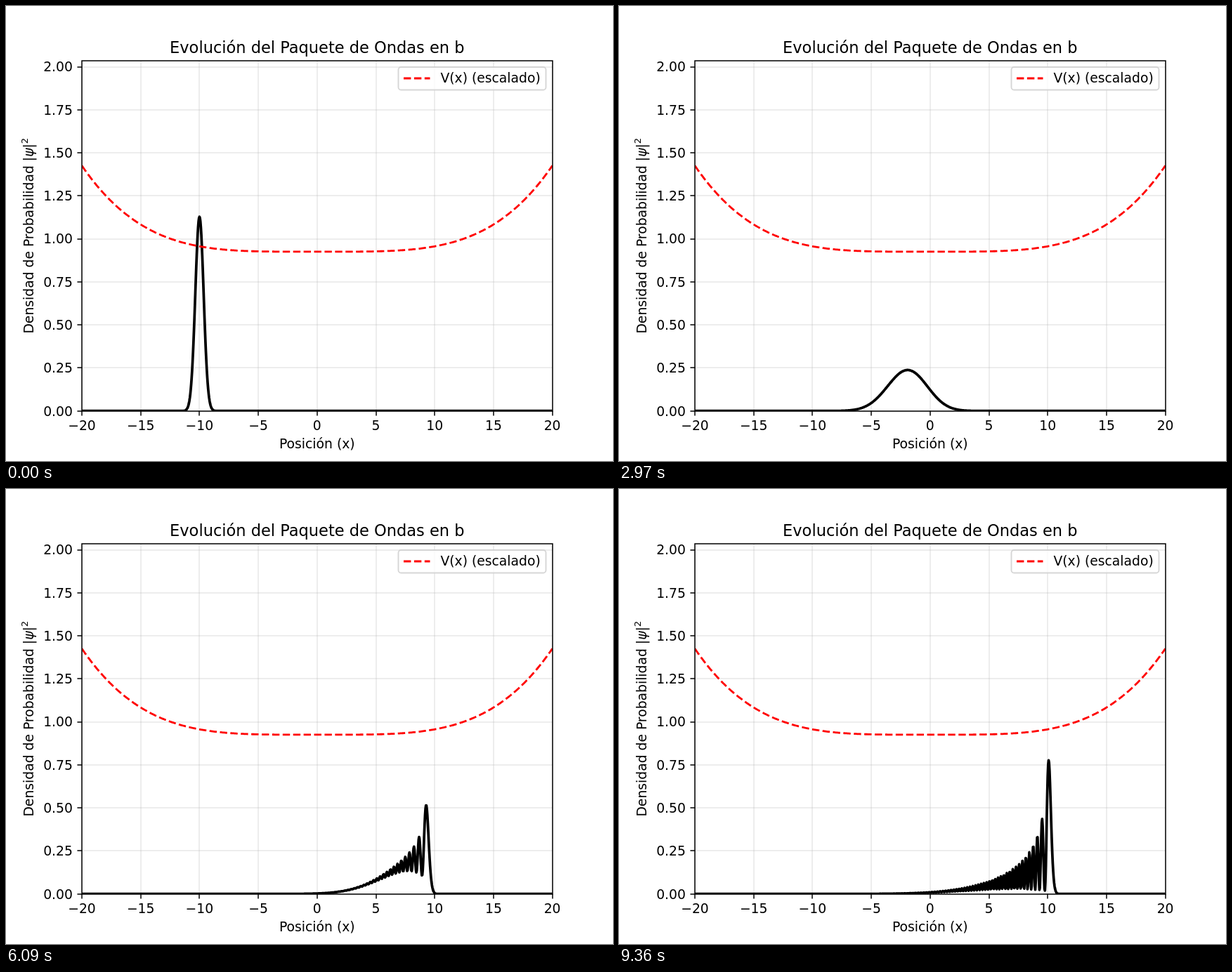
Animation, 864 px wide and 648 px high, one loop 9390 ms. Source, as an HTML page:

```html
<!DOCTYPE html>
<html lang="es">
<head>
<meta charset="utf-8">
<title>Evolución del paquete de ondas</title>
<style>
  html, body { margin: 0; width: 100%; height: 100%; overflow: hidden; background: #fff; }
  svg { display: block; width: 864px; height: 648px; font: 18.75px "DejaVu Sans", sans-serif; }
  .grid { stroke: #b0b0b0; stroke-opacity: .3; stroke-width: 1.5; }
  .axis { stroke: #000; stroke-width: 1.5; fill: none; }
  .potential { stroke: #f00; stroke-width: 2.8125; stroke-dasharray: 10.406 4.5; fill: none; }
  .density { stroke: #000; stroke-width: 3.75; stroke-linejoin: round; fill: none; }
  .legend { fill: #fff; fill-opacity: .8; stroke: #ccc; stroke-opacity: .8; stroke-width: 1.875; }
  .mid { text-anchor: middle; }
  .end { text-anchor: end; }
</style>
</head>
<body>
<svg viewBox="0 0 864 648">
  <clipPath id="plot"><rect x="108" y="78" width="670" height="499"/></clipPath>
  <g id="grid"></g>
  <g clip-path="url(#plot)">
    <path id="density" class="density"/>
    <path id="potential" class="potential"/>
  </g>
  <g id="ticks"></g>
  <rect class="axis" x="108" y="78" width="670" height="499"/>
  <text class="mid" x="442.8" y="66.5" font-size="22.5">Evolución del Paquete de Ondas en b</text>
  <text class="mid" x="442.8" y="630">Posición (x)</text>
  <text class="mid" transform="translate(38.5 327.2) rotate(-90)">Densidad de Probabilidad |<tspan font-style="italic">ψ</tspan>|<tspan dy="-7.3" font-size="13.125">2</tspan></text>
  <rect class="legend" x="558.5" y="87" width="210" height="32.5" rx="3.75"/>
  <path class="potential" d="M566 103H603.5"/>
  <text x="618.4" y="109">V(x) (escalado)</text>
</svg>
<script>
const FRAMES = 313, FRAME_MS = 30;
const N = 1024, L = 40, DX = L / N;
const SUBSTEPS = 4, DT = 0.032 / SUBSTEPS;
const X0 = -10, P0 = 2, SIGMA = 0.5, LAMBDA = 0.008;
const PEAK = 1.851;

const $ = id => document.getElementById(id);
const px = x => 108 + (x + 20) * 16.74;
const py = y => 576.72 - y * 498.96 / (1.1 * PEAK);

function drawAxes() {
  let grid = '', ticks = '';
  for (let x = -20; x <= 20; x += 5) {
    const p = Math.round(px(x));
    grid += `<path class="grid" d="M${p} 78V577"/>`;
    ticks += `<path class="axis" d="M${p} 577v6.56"/>` +
      `<text class="mid" x="${px(x)}" y="604">${String(x).replace('-', '\u2212')}</text>`;
  }
  for (let i = 0; i <= 8; i++) {
    const y = i / 4, p = Math.round(py(y));
    grid += `<path class="grid" d="M108 ${p}H778"/>`;
    ticks += `<path class="axis" d="M108 ${p}h-6.56"/>` +
      `<text class="end" x="94.9" y="${py(y) + 6.8}">${y.toFixed(2)}</text>`;
  }
  $('grid').innerHTML = grid;
  $('ticks').innerHTML = ticks;
}

function curve(f, count) {
  let d = '';
  for (let i = 0; i <= count; i++) {
    const x = -20 + L * i / count;
    d += (i ? 'L' : 'M') + px(x).toFixed(2) + ' ' + py(f(x, i)).toFixed(2);
  }
  return d;
}

// In-place radix-2 transform; swapping re and im gives the inverse.
const twiddle = Array.from({ length: N / 2 }, (_, i) => {
  const a = -2 * Math.PI * i / N;
  return [Math.cos(a), Math.sin(a)];
});
const cosT = Float64Array.from(twiddle, w => w[0]);
const sinT = Float64Array.from(twiddle, w => w[1]);

function fft(re, im) {
  for (let i = 1, j = 0; i < N; i++) {
    let bit = N >> 1;
    for (; j & bit; bit >>= 1) j ^= bit;
    j ^= bit;
    if (i < j) {
      [re[i], re[j]] = [re[j], re[i]];
      [im[i], im[j]] = [im[j], im[i]];
    }
  }
  for (let size = 2; size <= N; size *= 2) {
    const half = size / 2, stride = N / size;
    for (let s = 0; s < N; s += size) {
      for (let k = 0; k < half; k++) {
        const a = s + k, b = a + half, c = cosT[k * stride], d = sinT[k * stride];
        const tr = re[b] * c - im[b] * d, ti = re[b] * d + im[b] * c;
        re[b] = re[a] - tr; im[b] = im[a] - ti;
        re[a] += tr; im[a] += ti;
      }
    }
  }
}

// Factors scale * exp(-i * angle(n)) for every grid point.
function phases(angle, scale) {
  const c = new Float64Array(N), s = new Float64Array(N);
  for (let n = 0; n < N; n++) {
    c[n] = scale * Math.cos(angle(n));
    s[n] = -scale * Math.sin(angle(n));
  }
  return { c, s };
}

function rotate(re, im, { c, s }) {
  for (let n = 0; n < N; n++) {
    const r = re[n];
    re[n] = r * c[n] - im[n] * s[n];
    im[n] = r * s[n] + im[n] * c[n];
  }
}

// Split-operator evolution of a Gaussian packet in a quartic well.
function evolve() {
  const re = new Float64Array(N), im = new Float64Array(N);
  const norm = 1 / Math.sqrt(SIGMA * Math.sqrt(Math.PI));
  for (let n = 0; n < N; n++) {
    const u = -20 + n * DX - X0;
    const amp = norm * Math.exp(-u * u / (2 * SIGMA * SIGMA));
    re[n] = amp * Math.cos(P0 * u);
    im[n] = amp * Math.sin(P0 * u);
  }
  const halfV = phases(n => LAMBDA * (-20 + n * DX) ** 4 * DT / 2, 1);
  const kinetic = phases(n => {
    const p = (n < N / 2 ? n : n - N) * 2 * Math.PI / L;
    return p * p / 2 * DT;
  }, 1 / N);

  const out = [];
  for (let f = 0; f < FRAMES; f++) {
    out.push(Float32Array.from(re, (r, n) => r * r + im[n] * im[n]));
    for (let s = 0; s < SUBSTEPS; s++) {
      rotate(re, im, halfV);
      fft(re, im);
      rotate(re, im, kinetic);
      fft(im, re);
      rotate(re, im, halfV);
    }
  }
  return out;
}

drawAxes();
$('potential').setAttribute('d', curve(x => PEAK / 2 + 0.5 * (x / 20) ** 4, 400));

const densities = evolve();
let shown = -1;

function render() {
  const frame = Math.floor(performance.now() / FRAME_MS) % FRAMES;
  if (frame !== shown) {
    shown = frame;
    const rho = densities[frame];
    $('density').setAttribute('d', curve((x, i) => rho[i % N], N));
  }
  requestAnimationFrame(render);
}
render();
</script>
</body>
</html>
```
